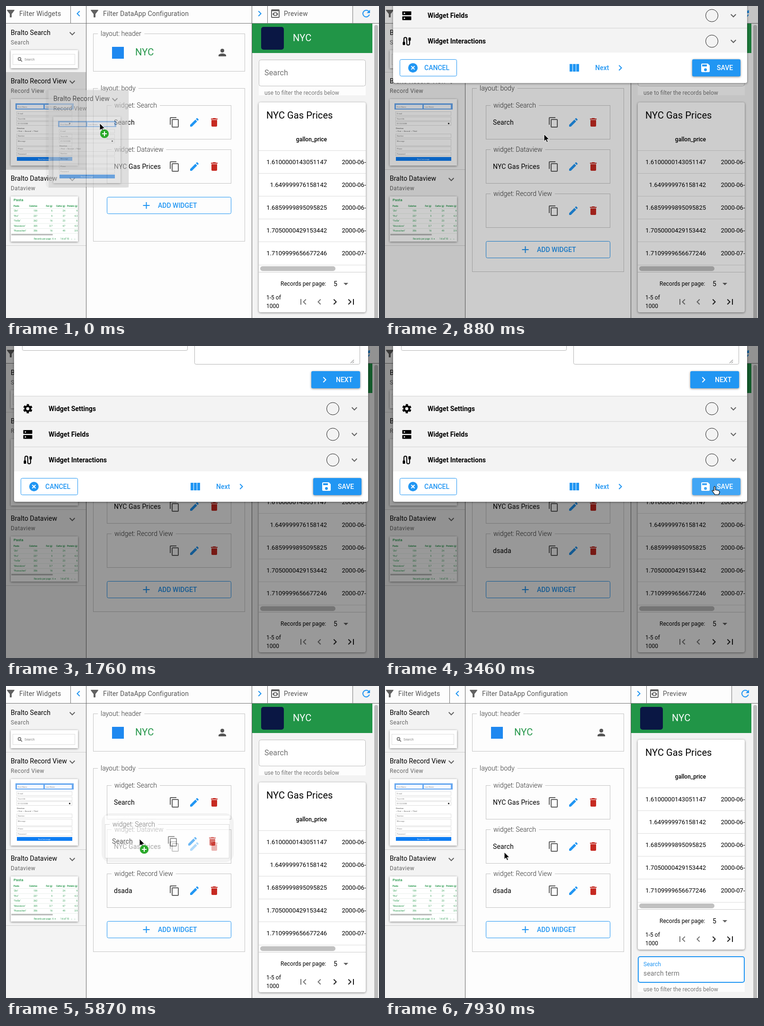
These frames come from a looping animation (788x657 px, 7.99 s). An HTML page:

```html
<!DOCTYPE html>
<html lang="en">
<head>
<meta charset="utf-8">
<title>Widget builder</title>
<style>
  html, body { margin: 0; width: 100%; height: 100%; overflow: hidden; background: #fdfdfd; }
  svg { display: block; width: 788px; height: 657px; font-family: Roboto, "Open Sans", sans-serif; }
  text { white-space: pre; }
  .card { filter: drop-shadow(0 1px 2px #0007); }
  .frame { fill: none; stroke: #8c8c8c; stroke-dasharray: 1 1; }
  .legend { font-weight: 300; fill: #333; stroke: #fdfdfd; stroke-width: 14px; paint-order: stroke; }
</style>
</head>
<body>
<svg id="stage" viewBox="0 0 788 657"></svg>
<script>
const LOOP = 7990, BLUE = '#2196f3', GREEN = '#219547', GREY = '#616161';

const ICONS = {
  filter: 'M4.25 5.61C6.27 8.2 10 13 10 13v6c0 .55.45 1 1 1h2c.55 0 1-.45 1-1v-6s3.72-4.8 5.74-7.39A1 1 0 0 0 18.95 4H5.04c-.83 0-1.3.95-.79 1.61z',
  left: 'M15.41 7.41L14 6l-6 6 6 6 1.41-1.41L10.83 12z',
  right: 'M10 6L8.59 7.41 13.17 12l-4.58 4.59L10 18l6-6z',
  down: 'M16.59 8.59L12 13.17 7.41 8.59 6 10l6 6 6-6z',
  caret: 'M7 10l5 5 5-5z',
  first: 'M18.41 16.59L13.82 12l4.59-4.59L17 6l-6 6 6 6zM6 6h2v12H6z',
  last: 'M5.59 7.41L10.18 12l-4.59 4.59L7 18l6-6-6-6zM16 6h2v12h-2z',
  preview: 'M19 3H5a2 2 0 0 0-2 2v14a2 2 0 0 0 2 2h14a2 2 0 0 0 2-2V5a2 2 0 0 0-2-2zm0 16H5V7h14v12zM12 9c-2.73 0-5.06 1.66-6 4 .94 2.34 3.27 4 6 4s5.06-1.66 6-4c-.94-2.34-3.27-4-6-4zm0 6.5a2.5 2.5 0 0 1 0-5 2.5 2.5 0 0 1 0 5z',
  refresh: 'M17.65 6.35A8 8 0 1 0 19.73 14h-2.08A6 6 0 1 1 16.22 7.78L13 11h7V4z',
  person: 'M12 12a4 4 0 1 0 0-8 4 4 0 0 0 0 8zm0 2c-2.67 0-8 1.34-8 4v2h16v-2c0-2.66-5.33-4-8-4z',
  copy: 'M16 1H4a2 2 0 0 0-2 2v14h2V3h12V1zm3 4H8a2 2 0 0 0-2 2v14a2 2 0 0 0 2 2h11a2 2 0 0 0 2-2V7a2 2 0 0 0-2-2zm0 16H8V7h11v14z',
  edit: 'M3 17.25V21h3.75L17.81 9.94l-3.75-3.75L3 17.25zM20.71 7.04a1 1 0 0 0 0-1.41l-2.34-2.34a1 1 0 0 0-1.41 0l-1.83 1.83 3.75 3.75z',
  trash: 'M6 19a2 2 0 0 0 2 2h8a2 2 0 0 0 2-2V7H6v12zM19 4h-3.5l-1-1h-5l-1 1H5v2h14V4z',
  plus: 'M19 13h-6v6h-2v-6H5v-2h6V5h2v6h6z',
  save: 'M17 3H5a2 2 0 0 0-2 2v14a2 2 0 0 0 2 2h14a2 2 0 0 0 2-2V7l-4-4zm-5 16a3 3 0 1 1 0-6 3 3 0 0 1 0 6zm3-10H5V5h10v4z'
};

const rect = (x, y, w, h, fill, more = '') =>
  `<rect x="${x}" y="${y}" width="${w}" height="${h}" fill="${fill}" ${more}/>`;
const outline = (x, y, w, h, color, more = 'rx="3"') => rect(x, y, w, h, 'none', `stroke="${color}" ${more}`);
const text = (x, y, s, size = 14, fill = '#000', more = '') =>
  `<text x="${x}" y="${y}" font-size="${size}" fill="${fill}" ${more}>${s}</text>`;
const icon = (name, x, y, fill = GREY) => `<path transform="translate(${x} ${y})" d="${ICONS[name]}" fill="${fill}"/>`;
const hline = (x, y, w, color = '#d0d0d0') => rect(x, y, w, 1, color);
const group = (id, body, more = '') => `<g id="${id}" ${more}>${body}</g>`;
const spaced = n => `letter-spacing="${n}"`;
const END = 'text-anchor="end"', MEDIUM = 'font-weight="500"', BOLD = 'font-weight="700"';

const frame = (x, y, w, h, label, id = '') =>
  `<rect id="${id}" class="frame" x="${x}.5" y="${y}.5" width="${w}" height="${h}"/>` +
  `<text class="legend" x="${x + 16}" y="${y + 5}" font-size="14">${label}</text>`;

const widget = (id, label, name) => group(id,
  frame(213, 209, 262, 71, 'widget: ' + label) +
  text(228, 250, name, 14, '#000', spaced(.12) + ` id="${id}Name"`) +
  icon('copy', 344, 233) + icon('edit', 386, 233, BLUE) + icon('trash', 428, 233, '#c62a22'));

const rowTitle = (y, name) =>
  text(10, y, 'Bralto ' + name, 14, '#000', spaced(.06)) +
  text(10, y + 20, name, 12, '#666', spaced(.4)) + icon('down', 128, y - 15);

function searchRow() {
  return rowTitle(61, 'Search') + rect(10, 93, 142, 38, '#fff', 'class="card"') +
    outline(14.5, 101.5, 131, 22, '#ddd', '') +
    '<path d="M34 117l-4-4" stroke="#555" stroke-width="1.5"/><circle cx="28.500" cy="111.500" r="3" fill="none" stroke="#555" stroke-width="1.300"/>' +
    text(39, 115, 'Search', 7, '#888');
}

function recordRow() {
  const fields = [['E-mail', 222, 8], ['Your title', 233, 8], ['01/22/2008', 243, 8], ['Number', 269, 8],
    ['Message', 280, 14], ['Phone', 296, 8], ['Password', 307, 8]];
  return rect(0, 140, 169, 204, '#f3f3f3') + rowTitle(163, 'Record View') +
    rect(10, 196, 142, 140, '#fff', 'class="card"') +
    rect(20, 205, 123, 13, '#68a8f0') + rect(23, 208, 56, 8, '#f4f8ff') + rect(82, 208, 57, 8, '#f4f8ff') +
    text(25, 213.5, 'First Name', 4, '#888') + text(84, 213.5, 'Last Name', 4, '#888') +
    fields.map(([s, y, h]) => outline(22.5, y + .5, 117, h, '#e0e0e0', '') + text(25, y + 5.5, s, 4, '#777')).join('') +
    rect(133, 246, 3, 3, '#444') + text(23, 259, 'Direction', 4, '#333') + text(23, 265, '○ First  ○ Second  ○ Third', 4, '#555') +
    rect(23, 318, 117, 8, '#0d7cf2') + text(81, 323.5, 'Send message', 4, '#fff', 'text-anchor="middle"') +
    rect(0, 140, 169, 205, '#000', 'id="highlight" opacity=".17"');
}

function dataRow() {
  const lines = ['Pasta|Calories|Fat (g)|Carbs (g)|Protein (g)', '"Ziti"|159|6|24|4', '"Pici"|237|9|37|4.3',
    '"Trofie"|262|16|23|6', '"Mezzalune"|305|3.7|67|4.3', '"Pizzoccheri"|356|16|49|3.9'];
  const right = [0, 66, 98, 125, 151];
  return rowTitle(368, 'Dataview') + rect(10, 401, 142, 95, '#fff', 'class="card"') +
    text(16, 411, 'Pasta', 8, GREEN, MEDIUM) +
    lines.map((line, i) => line.split('|').map((s, c) =>
      text(c ? right[c] : 16, 422.5 + i * 10.5, s, 4.6, GREEN, (c ? END : '') + (i ? '' : BOLD))).join('') +
      hline(10, 426 + i * 10.5, 142, '#e8efe9')).join('') +
    rect(11, 480, 88, 3, '#bbb', 'rx="1.5"') +
    text(59, 492, 'Records per page:', 4.6, GREEN) + text(98, 492, '6  ▾', 4.6, GREEN) +
    text(115, 492, '1-6 of 10', 4.6, GREEN) + text(138, 492, '‹    ›', 5, GREEN);
}

function sidePanel() {
  return rect(0, 37, 169, 620, '#f3f3f3') + searchRow() + group('record', recordRow()) + dataRow() +
    [139, 344, 504].map(y => hline(0, y, 169, '#cfcfcf')).join('');
}

function builder() {
  return frame(184, 58, 320, 79, 'layout: header') + rect(224, 86, 25, 25, '#1e88f0') +
    text(273, 104, 'NYC', 20, GREEN, spaced(.25)) + icon('person', 445, 86, '#555') +
    frame(184, 173, 320, 322, 'layout: body', 'bodyFrame') +
    widget('search', 'Search', 'Search') + widget('data', 'Dataview', 'NYC Gas Prices') + widget('rec', 'Record View', '') +
    group('add', outline(213.5, 402.5, 262, 35, BLUE) + icon('plus', 284.5, 408, BLUE) +
      text(321, 425, 'ADD WIDGET', 14, BLUE, MEDIUM));
}

function preview() {
  const prices = ['1.6100000143051147', '1.649999976158142', '1.6859999895095825', '1.7050000429153442', '1.7109999656677246'];
  const helper = rect(534, 168, 226, 20, '#fdfdfd') + text(546, 187, 'use to filter the records below', 12, '#757575');
  return rect(520, 37, 254, 620, '#f3f3f3') + rect(774, 37, 14, 620, '#f4f4f4') +
    rect(778, 40, 8, 640, '#bdbdbd', 'rx="4"') +
    rect(520, 37, 254, 62, GREEN) + rect(539, 44, 48, 48, '#0a1744', 'rx="5"') +
    text(606, 74, 'NYC', 20, '#fff', spaced(.25)) +
    group('find', helper + rect(534.5, 113.5, 225, 55, '#fff', 'rx="4" stroke="#bdbdbd"') +
      text(546, 146, 'Search', 16, '#707070', spaced(.15))) +
    group('focused', helper + rect(535, 114, 224, 54, '#fff', `rx="4" stroke="${BLUE}" stroke-width="2"`) +
      text(546, 134, 'Search', 12, BLUE) + text(546, 154, 'search term', 14, '#757575', spaced(.15)), 'transform="translate(0 456)"') +
    group('table', rect(534, 203, 226, 442, '#fff', 'rx="4" class="card"') +
      text(550, 237, 'NYC Gas Prices', 20, '#000', spaced(.1)) + text(678, 285, 'gallon_price', 12, '#000', END + MEDIUM) +
      prices.map((p, i) => hline(534, 304 + i * 48, 226, '#ddd') + text(678, 333 + i * 48, p, 13, '#000', END) +
        text(709.5, 333 + i * 48, i < 4 ? '2000-06-' : '2000-07-', 13)).join('') +
      hline(534, 545, 226, '#ddd') + rect(537, 548, 159, 10, '#c1c1c1', 'rx="5"') + hline(534, 560, 226, '#ccc') +
      text(580, 589, 'Records per page:', 12) + text(692, 590, '5') + icon('caret', 706, 573) +
      text(550, 618, '1-5 of', 12) + text(550, 636, '1000', 12) +
      icon('first', 616, 611, '#777') + icon('left', 650, 611, '#777') + icon('right', 683, 611, '#222') + icon('last', 717, 611, '#222'));
}

function topBar() {
  return rect(0, 0, 788, 36, '#fdfdfd') + rect(733, 0, 55, 36, '#f3f3f3') +
    icon('filter', -2, 4) + text(28, 21, 'Filter Widgets', 14, '#555', spaced(.2)) + icon('left', 141, 4, BLUE) +
    icon('filter', 175, 4) + text(205, 21, 'Filter DataApp Configuration', 14, '#555', spaced(.16)) + icon('right', 524, 4, BLUE) +
    icon('preview', 557, 4) + text(587, 21, 'Preview', 14, '#555', spaced(.25)) + icon('refresh', 749, 4, BLUE) +
    hline(0, 36, 788, '#777') + [136, 552, 732].map(x => rect(x, 0, 1, 36, '#777')).join('') +
    rect(169, 0, 1, 657, '#666') + rect(519, 0, 1, 657, '#666');
}

function dialog() {
  const gear = '<g fill="none" stroke="#000"><circle cx="46" cy="132" r="5.300" stroke-width="4"/>' +
    '<circle cx="46" cy="132" r="8" stroke-width="3.600" stroke-dasharray="4.600 3.778" stroke-dashoffset="-1.890"/></g>';
  const servers = [177, 187.5].map(y => rect(36.5, y, 19, 8, '#000', 'rx="1"') +
    `<circle cx="41" cy="${y + 4}" r="1.500" fill="#f3f3f3"/>`).join('');
  const route = '<path d="M40 243v-8a3 3 0 0 1 6 0v10a3 3 0 0 0 6 0v-8" fill="none" stroke="#000" stroke-width="2"/>' +
    rect(37.5, 241, 5, 7, '#000', 'rx="1.500"') + rect(49.5, 232, 5, 7, '#000', 'rx="1.500"');
  return rect(17, -400, 748, 728, '#fff', 'rx="4" class="card"') +
    outline(34.5, -20.5, 349, 30, '#b5b5b5') + outline(398.5, -20.5, 349, 59, '#b5b5b5') +
    '<path d="M728 36l7-7m-3 7l3-3" stroke="#555"/>' +
    rect(645, 53, 103, 36, BLUE, 'rx="3" class="card"') + icon('right', 661, 59, '#fff') + text(697, 76, 'NEXT', 14, '#fff', MEDIUM) +
    rect(17, 105, 748, 159, '#f3f3f3') +
    ['Settings', 'Fields', 'Interactions'].map((s, i) => hline(17, 105 + 53.5 * i, 748, '#d2d2d2') +
      text(90, 137 + 54 * i, 'Widget ' + s, 14, '#000', BOLD) +
      `<circle cx="690.500" cy="${132 + 54 * i}" r="13" fill="none" stroke="#222"/>` + icon('down', 724, 120 + 54 * i)).join('') +
    gear + servers + route +
    outline(31.5, 278.5, 120, 35, BLUE) + `<circle cx="59" cy="296" r="10" fill="${BLUE}"/>` +
    '<path d="M55.500 292.500l7 7m0-7l-7 7" stroke="#fff" stroke-width="2"/>' + text(83, 301, 'CANCEL', 14, BLUE, MEDIUM) +
    [390, 397, 404].map(x => rect(x, 288, 6, 16, BLUE)).join('') +
    text(444, 301, 'Next', 14, BLUE, MEDIUM) + icon('right', 485, 284, BLUE) +
    rect(649, 278, 102, 36, BLUE, 'rx="3" class="card"') + icon('save', 665, 284, '#fff') + text(701, 301, 'SAVE', 14, '#fff', MEDIUM) +
    '<rect id="hover"/>';
}

const $ = id => document.getElementById(id);
$('stage').innerHTML = rect(0, 0, 788, 657, '#fdfdfd') + sidePanel() + builder() + preview() + topBar() +
  rect(515, 0, 5, 657, BLUE, 'id="splitter"') +
  group('recordGhost', rect(-6, 137, 176, 209, '#000', 'rx="8" opacity=".06"') + '<use href="#record"/>', 'opacity=".6"') +
  group('searchGhost', rect(206, 186, 279, 103, '#000', 'rx="18" opacity=".07"') + rect(213, 191, 263, 90, '#fff') +
    '<use href="#search"/>', 'opacity=".65"') +
  rect(0, 0, 788, 657, '#000', 'id="dim"') + group('dialog', dialog()) +
  group('cursor',
    '<path id="arrow" d="M0 0v15l3.500-3.200 2.300 5.400 2.600-1.100-2.300-5.200h4.900z" fill="#000" stroke="#fff"/>' +
    '<path id="hand" d="M-1 2q1-3 3 0v6l5 1q4 1 4 4l-2 5H1l-6-8q1-2 4 0z" fill="#fff" stroke="#000" stroke-width="1.200" stroke-linejoin="round"/>' +
    group('badge', '<circle cx="10" cy="22" r="9.500" fill="#2aa82a" stroke="#fff" stroke-opacity=".6"/><path d="M5 22h10m-5-5v10" stroke="#fff" stroke-width="2.200"/>'));

// Pointer path: time, x, y
const PATH = [[0, 198, 247], [60, 198, 247], [400, 354, 287], [640, 354, 287], [800, 336, 270], [1120, 336, 270],
  [1410, 345, 255], [1730, 365, -30], [3090, 365, -30], [3091, 700, 46], [3440, 696, 295], [3620, 696, 295],
  [4210, 476, 277], [4380, 373, 334], [4750, 320, 398], [5130, 272, 385], [5440, 286, 240], [5500, 286, 240],
  [5870, 282, 322], [6160, 282, 345], [6400, 282, 345], [6800, 198, 378], [7150, 212, 370], [7800, 252, 350], [LOOP, 252, 350]];
// Hover zones in the dialog: x, y, width, height, tint, opacity
const ZONES = [[645, 53, 103, 36, '#fff', .15], [649, 278, 102, 36, '#fff', .15],
  ...[106, 160, 213].map(y => [17, y, 748, 52, '#000', .06])];

const clamp = v => Math.min(1, Math.max(0, v));
const cubicOut = v => 1 - (1 - clamp(v)) ** 3;
const show = (id, on) => $(id).style.display = on ? '' : 'none';
const move = (id, x, y) => $(id).setAttribute('transform', `translate(${x} ${y})`);
const set = (id, attrs) => Object.entries(attrs).forEach(([k, v]) => $(id).setAttribute(k, v));

function pointerAt(t) {
  const i = PATH.findIndex(p => p[0] > t), [t0, x0, y0] = PATH[i - 1], [t1, x1, y1] = PATH[i];
  const k = (t - t0) / (t1 - t0), s = k * k * (3 - 2 * k);
  return [x0 + (x1 - x0) * s, y0 + (y1 - y0) * s];
}

function draw(t) {
  const within = (a, b) => t >= a && t < b;
  const [x, y] = pointerAt(t);
  const draggingRecord = t < 640, draggingSearch = within(5500, 6160);
  const dropped = t >= 640, swapped = t >= 6160;

  show('highlight', draggingRecord || within(3700, 5500));
  show('recordGhost', draggingRecord);
  move('recordGhost', x - 108, y - 210);
  show('searchGhost', draggingSearch);
  move('searchGhost', x - 286, y - 240);

  move('search', 0, swapped ? 93 : 0);
  move('data', 0, swapped ? 0 : 93);
  move('rec', 0, 186);
  show('rec', dropped);
  $('recName').textContent = 'dsada'.slice(0, clamp((t - 2720) / 300) * 5);
  set('bodyFrame', { height: dropped ? 386 : 322 });
  move('add', 0, dropped ? 93 : 0);

  const moved = t >= 6640, ready = !within(7270, 7450);
  move('table', 0, moved ? -90 : 0);
  move('find', 0, moved ? 456 : 0);
  show('table', ready);
  show('find', t < 7270);
  show('focused', t >= 7450);

  set('splitter', { opacity: Math.min(clamp((t - 4030) / 100), clamp((4340 - t) / 60)) });

  const open = cubicOut((t - 820) / 300) * (1 - cubicOut((t - 3640) / 300));
  set('dim', { opacity: open * .4 });
  show('dialog', open > 0);
  move('dialog', 0, 328 * (open - 1));

  const zone = open === 1 && ZONES.find(([zx, zy, w, h]) => x >= zx && x < zx + w && y >= zy && y < zy + h);
  show('hover', zone);
  if (zone) {
    const [zx, zy, width, height, fill, opacity] = zone;
    set('hover', { x: zx, y: zy, width, height, fill, opacity });
  }
  move('cursor', x, y);
  show('hand', zone);
  show('arrow', !zone);
  show('badge', draggingRecord || draggingSearch);
}

const start = performance.now();
(function tick() {
  draw((performance.now() - start) % LOOP);
  requestAnimationFrame(tick);
})();
</script>
</body>
</html>
```
